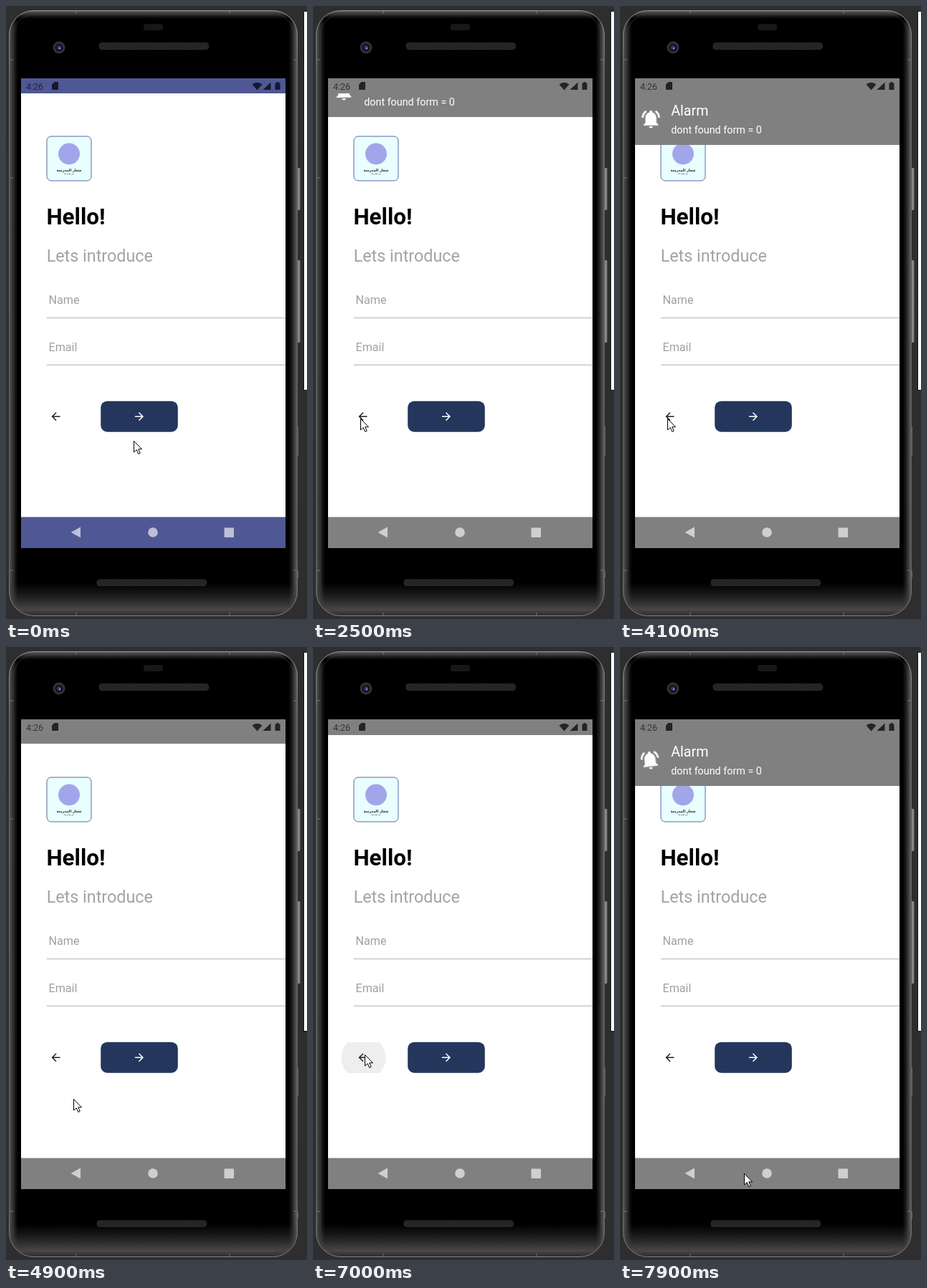
These frames come from a looping animation (420x856 px, 8 s). An HTML page:

```html
<!DOCTYPE html>
<html lang="en">
<head>
<meta charset="utf-8">
<title>Form alert</title>
<style>
html, body { margin: 0; width: 100%; height: 100%; overflow: hidden; background: #2e2e30; }
svg { display: block; width: 420px; height: 856px; font-family: Roboto, sans-serif; }
.bar { fill: #4f5894; }
.grille { fill: url(#mesh); stroke: #2c2c2c; }
#bell { transform-origin: 43px 160px; }
</style>
</head>
<body>
<svg viewBox="0 0 420 856">
  <defs>
    <linearGradient id="side">
      <stop offset="0" stop-color="#5c5c5c"/>
      <stop offset=".008" stop-color="#3c3c3c"/>
      <stop offset=".018" stop-color="#1e1e1e"/>
      <stop offset=".03" stop-color="#000"/>
      <stop offset=".97" stop-color="#000"/>
      <stop offset=".982" stop-color="#1e1e1e"/>
      <stop offset=".992" stop-color="#444"/>
      <stop offset="1" stop-color="#666"/>
    </linearGradient>
    <linearGradient id="glow" x2="0" y2="1">
      <stop offset="0" stop-color="#777" stop-opacity=".8"/>
      <stop offset=".008" stop-color="#333" stop-opacity=".7"/>
      <stop offset=".016" stop-color="#000" stop-opacity="0"/>
      <stop offset=".945" stop-color="#333" stop-opacity="0"/>
      <stop offset=".99" stop-color="#505050" stop-opacity=".9"/>
      <stop offset="1" stop-color="#2a2a2a"/>
    </linearGradient>
    <linearGradient id="rim" x2="0" y2="1">
      <stop offset="0" stop-color="#999"/>
      <stop offset=".1" stop-color="#6c6c6c"/>
      <stop offset=".9" stop-color="#5c5c5c"/>
      <stop offset="1" stop-color="#858585"/>
    </linearGradient>
    <linearGradient id="key">
      <stop offset="0" stop-color="#222"/>
      <stop offset=".6" stop-color="#9a9a9a"/>
      <stop offset="1" stop-color="#444"/>
    </linearGradient>
    <pattern id="mesh" width="3" height="3" patternUnits="userSpaceOnUse">
      <rect width="3" height="3" fill="#1c1c1c"/>
      <path d="M0 0h1v1h-1zM1.5 1.5h1v1h-1z" fill="#444"/>
    </pattern>
    <clipPath id="below"><rect x="21" y="122" width="369" height="592"/></clipPath>
    <clipPath id="row"><rect x="21" y="552" width="110" height="43"/></clipPath>
    <path id="arrow" d="M12 4l-1.41 1.41L16.17 11H4v2h12.17l-5.58 5.59L12 20l8-8z"/>
  </defs>

  <rect width="420" height="856" fill="#2e2e30"/>
  <path d="M415.500 7V536.500H420" fill="none" stroke="#111"/>
  <rect x="416" y="8" width="4" height="528" fill="#fff"/>

  <!-- phone -->
  <g fill="url(#key)">
    <rect x="405" y="226" width="6" height="59" rx="2"/>
    <rect x="405" y="355" width="6" height="115" rx="2"/>
  </g>
  <path d="M407.500 587v41M407.500 789v9" stroke="#666"/>
  <rect x="4.500" y="6.500" width="402" height="845" rx="34" fill="url(#side)"/>
  <rect x="4.500" y="6.500" width="402" height="845" rx="34" fill="url(#glow)" stroke="url(#rim)"/>
  <rect x="10.500" y="11.500" width="391" height="835" rx="29" fill="none" stroke="#3a3a3a" stroke-opacity=".6"/>
  <path d="M5 75h5M401 75h5M5 240h5M5 788h5M401 788h5M98 7v4M312 7v4M98 847v4M312 847v4" stroke="#777"/>
  <rect x="192" y="25" width="27" height="9" rx="3" fill="#17171b"/>
  <circle cx="74" cy="58" r="8.500" fill="#333336"/>
  <circle cx="74" cy="58" r="5.500" fill="#11131f"/>
  <circle cx="74" cy="58" r="3" fill="#2c3568"/>
  <circle cx="75" cy="59" r="1.200" fill="#8b9be0"/>
  <rect class="grille" x="130" y="51.500" width="152.500" height="9" rx="3.500"/>
  <rect class="grille" x="127" y="801" width="152.500" height="8.500" rx="3.500"/>

  <!-- form -->
  <rect x="21" y="101" width="369" height="656" fill="#fff"/>
  <rect x="57" y="182" width="62" height="62" rx="6" fill="#e8feff" stroke="#5a6ba6"/>
  <circle cx="88" cy="206.500" r="15" fill="#a3a5ea"/>
  <g text-anchor="middle" font-family="DejaVu Sans, sans-serif" fill="#222">
    <text x="88" y="231" font-size="5" font-weight="bold">شعار المدرسة</text>
    <text x="88" y="234.500" font-size="2.500">نص قصير هنا</text>
  </g>
  <text x="56.400" y="304.700" font-size="31.400" font-weight="700">Hello!</text>
  <text x="56.700" y="356.800" font-size="23.340" fill="#a3a3a3">Lets introduce</text>
  <g font-size="16.150" fill="#a0a0a0">
    <text x="59.500" y="416">Name</text>
    <text x="59.500" y="482">Email</text>
  </g>
  <path d="M57 435.500H390M57 501.300H390" stroke="#d2d2d2" stroke-width="2"/>
  <g clip-path="url(#row)">
    <circle id="ripple" cx="70.500" cy="573.500" r="31" fill="#eee"/>
  </g>
  <use href="#arrow" transform="translate(78.500 564.300) scale(-.75 .75)" fill="#222"/>
  <rect x="132.200" y="551.700" width="107.600" height="43" rx="9" fill="#24365c"/>
  <use href="#arrow" transform="translate(177 564.300) scale(.75)" fill="#fff"/>

  <!-- alert -->
  <g clip-path="url(#below)">
    <g id="alert" fill="#fff">
      <rect x="21" y="101" width="369" height="93" fill="#808080"/>
      <g id="bell">
        <path transform="translate(27.800 142.500) scale(1.28)" d="M7.580 4.080L6.150 2.650C3.750 4.480 2.170 7.300 2.030 10.500h2c.15-2.650 1.510-4.970 3.550-6.420zm12.390 6.420h2c-.15-3.200-1.730-6.020-4.120-7.850l-1.420 1.430c2.020 1.450 3.390 3.770 3.540 6.420zM18 11c0-3.070-1.640-5.640-4.500-6.320V4c0-.83-.67-1.500-1.500-1.500s-1.500.67-1.500 1.500v.68C7.630 5.360 6 7.920 6 11v5l-2 2v1h16v-1l-2-2v-5zm-6 11c.14 0 .27-.01.4-.04.65-.14 1.180-.58 1.440-1.180.1-.24.15-.5.15-.78h-4c.01 1.100.9 2 2.010 2z"/>
      </g>
      <text x="71.200" y="152.500" font-size="19.740">Alarm</text>
      <text x="71.200" y="178" font-size="14.350">dont found form = 0</text>
    </g>
  </g>

  <!-- system bars -->
  <rect class="bar" x="21" y="101" width="369" height="21"/>
  <rect class="bar" x="21" y="713.600" width="369" height="43.400"/>
  <g fill-opacity=".6">
    <text x="27.900" y="116.500" font-size="12.560">4:26</text>
    <path fill-opacity=".72" d="M67.500 106H72q1 0 1 1v9q0 1-1 1h-7q-1 0-1-1v-6.500zM343.500 109.500q7-5.500 14 0L350.500 117.500zM369.500 106.500V117H358.500zM375.500 107.500h2V106h3v1.500h2V117h-7z"/>
  </g>
  <g fill="#fff" fill-opacity=".62">
    <path d="M90.500 735L104 727.500V742.500z"/>
    <circle cx="205" cy="735" r="6.800"/>
    <rect x="304.500" y="728.500" width="13.500" height="13.500" rx="1"/>
  </g>

  <g id="cursor">
    <path d="M.5 .5V16L4.200 12.700L6.800 18.500L9.200 17.400L6.700 11.800H11.500Z" fill="#fff" stroke="#000"/>
  </g>
</svg>
<script>
const LOOP = 8000, STEP = 100;
const $ = id => document.getElementById(id);
const at = (x, y) => `translate(${x}px, ${y}px)`;

// rows: [ms, value], each value held until the next
function track(el, prop, rows) {
  const frames = rows.map(([ms, v]) => ({ offset: ms / LOOP, [prop]: v, easing: 'step-end' }));
  frames.push({ offset: 1, [prop]: rows[rows.length - 1][1] });
  el.animate(frames, { duration: LOOP, iterations: Infinity });
}

// one value per step, starting at ms
const run = (ms, values) => values.map((v, i) => [ms + i * STEP, v]);

// n eased points from a (excluded) to b (included)
const glide = (a, b, n) => Array.from({ length: n }, (_, i) => {
  const u = (i + 1) / n, e = u * u * (3 - 2 * u);
  return a.map((p, k) => Math.round(p + (b[k] - p) * e));
});

const path = [
  [0, [178, 607]],
  ...run(500, glide([178, 607], [66, 578], 8)),
  [1700, [66, 576]],
  ...run(4600, glide([66, 576], [94, 631], 4)),
  ...run(5000, glide([94, 631], [100, 632], 4)),
  ...run(5600, [[96, 624], [88, 606], [78, 582], [69, 562], [64, 554], [66, 558], [70, 565], [72, 568]]),
  [6700, [72, 569]],
  ...run(7100, glide([72, 569], [173, 735], 8)),
];
track($('cursor'), 'transform', path.map(([ms, p]) => [ms, at(...p)]));

const HIDDEN = -95, enter = [-71, -39, -24, -13, -7, 0];
const slide = [
  [0, HIDDEN], ...run(2400, enter),
  ...run(4600, [-8, -19, -34, -59, HIDDEN]),
  ...run(7000, enter),
];
track($('alert'), 'transform', slide.map(([ms, y]) => [ms, at(0, y)]));

// the bell leans left and back, counted from when the alert opens
const sway = [];
for (let ms = 0; ms < LOOP; ms += STEP) {
  const age = ms < 6830 ? Math.min(ms, 4100) - 2230 : ms - 6830;
  const lean = (1 - Math.cos(2 * Math.PI * age / 2000)) / 2;
  sway.push([ms, `${at(-lean, 0)} rotate(${-7 * lean}deg)`]);
}
track($('bell'), 'transform', sway);

for (const bar of document.querySelectorAll('.bar')) {
  track(bar, 'fill', [[0, '#4f5894'], [2300, '#808080'], [5100, '#4f5894'], [7000, '#808080']]);
}

track($('ripple'), 'r', [
  [0, '0px'], ...run(2100, ['12px', '20px', '26px', '31px', '0px']),
  [7000, '31px'], [7100, '0px'],
]);
</script>
</body>
</html>
```
